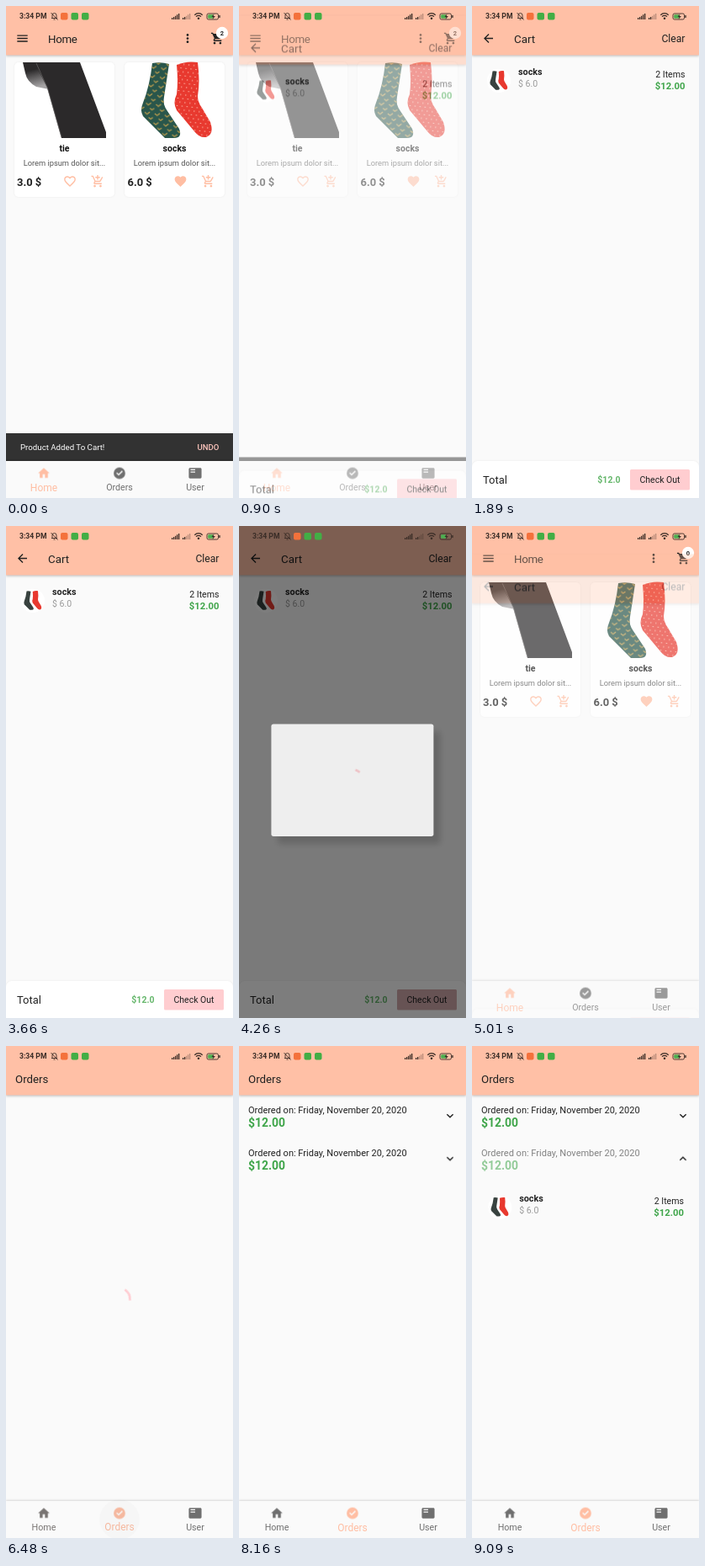
Animation, 270 px wide and 585 px high, one loop 9.24 s. Source, as an HTML page:

```html
<!DOCTYPE html>
<html lang="en">
<head>
<meta charset="utf-8">
<title>Shop app</title>
<style>
html, body { margin: 0; width: 100%; height: 100%; overflow: hidden; background: #fafafa; }
svg { display: block; width: 100vw; height: 100vh; overflow: hidden; font-family: Roboto, sans-serif; fill: #212121; }
svg * { animation-duration: 9240ms; animation-iteration-count: infinite; animation-fill-mode: both; }

.icon { transform: scale(.6875) translate(-12px, -12px); }
.b { font-weight: 700; }
.mid { text-anchor: middle; }
.end { text-anchor: end; }
.page { fill: #fafafa; }
.peach { fill: #ffbea3; }
.green { fill: #3fa54a; }
.grey { fill: #999; }
.bar { fill: #ffc0a6; filter: drop-shadow(0 1.6px 1.8px rgba(0, 0, 0, .26)); }
.title { font-size: 13.3px; }
.card { fill: #fff; filter: drop-shadow(0 .5px .8px rgba(0, 0, 0, .07)); }
.name { font-size: 10.5px; font-weight: 700; fill: #111; }
.blurb { font-size: 9.3px; fill: #555; }
.price { font-size: 12.9px; font-weight: 700; }
.small { font-size: 10.5px; }
.nav { fill: #fafafa; filter: drop-shadow(0 -.5px .8px rgba(0, 0, 0, .14)); }
.label { font-size: 12px; text-anchor: middle; transform-box: fill-box; transform-origin: 50% 75%; }
.off { fill: #6f6f6f; }
.off .label { transform: scale(.889); }

/* page transition */
.cart { animation-name: slide, fade; }
@keyframes slide {
  0%, 7.576% { transform: translateY(146.25px); animation-timing-function: cubic-bezier(.4, 0, .2, 1); }
  10.823%, 52.597% { transform: none; animation-timing-function: cubic-bezier(.8, 0, .6, 1); }
  55.844%, to { transform: translateY(146.25px); }
}
@keyframes fade {
  0%, 7.576% { opacity: 0; animation-timing-function: ease-in; }
  10.823%, 52.597% { opacity: 1; animation-timing-function: ease-out; }
  55.844%, to { opacity: 0; }
}
.snack { animation-name: snack; }
@keyframes snack {
  0%, 7.63% { transform: none; animation-timing-function: cubic-bezier(.8, 0, .6, 1); }
  10.335%, to { transform: translateY(34px); }
}

/* dialog */
.press { fill: #000; animation-name: press; animation-timing-function: linear; }
@keyframes press {
  0%, 44.7% { opacity: 0; }
  45.8%, 46.6% { opacity: .17; }
  50%, to { opacity: 0; }
}
.barrier { animation-name: barrier; }
@keyframes barrier {
  0%, 44.968% { opacity: 0; animation-timing-function: ease; }
  46.591%, 52.489% { opacity: .54; animation-timing-function: cubic-bezier(.75, 0, .75, .9); }
  54.113%, to { opacity: 0; }
}
.dialog { animation-name: dialog; }
.dialog rect { fill: #fff; filter: drop-shadow(8px 9px 3.5px rgba(0, 0, 0, .18)); }
@keyframes dialog {
  0%, 44.968% { opacity: 0; animation-timing-function: ease-out; }
  46.591%, 52.489% { opacity: 1; animation-timing-function: ease-in; }
  54.113%, to { opacity: 0; }
}

/* spinner: one turn of the arc takes a second */
.spin { fill: none; stroke: #ffcdd2; stroke-width: 2.75px; stroke-linecap: square; animation-name: turn, arc; animation-timing-function: linear; }
.dialog .spin { animation-delay: 4190ms; }
.loader .spin { animation-delay: 6362ms; }
@keyframes turn {
  0% { transform: rotate(-90deg); }
  10.823%, to { transform: rotate(216deg); }
}
@keyframes arc {
  0% { stroke-dasharray: 0 360; stroke-dashoffset: 0; animation-timing-function: cubic-bezier(.4, 0, .2, 1); }
  5.411% { stroke-dasharray: 270 90; stroke-dashoffset: 0; animation-timing-function: cubic-bezier(.4, 0, .2, 1); }
  10.823%, to { stroke-dasharray: 0 360; stroke-dashoffset: -270; }
}

/* hard switches */
.two, .zero, .home, .orders, .loader, .list, .line { animation-timing-function: step-end; }
.two { animation-name: two; }
.zero { animation-name: zero; }
.line { animation-name: line; }
.home { animation-name: home; }
.orders { animation-name: orders; }
.loader { animation-name: loader; }
.list { animation-name: list; }
@keyframes two { 0% { opacity: 1; } 50.87%, to { opacity: 0; } }
@keyframes zero { 0% { opacity: 0; } 50.87%, to { opacity: 1; } }
@keyframes line { 0% { opacity: 1; } 52.489%, to { opacity: 0; } }
@keyframes home { 0% { opacity: 1; } 68.669%, to { opacity: 0; } }
@keyframes orders { 0% { opacity: 0; } 68.669%, to { opacity: 1; } }
@keyframes loader { 0% { opacity: 1; } 76.299%, to { opacity: 0; } }
@keyframes list { 0% { opacity: 0; } 76.299%, to { opacity: 1; } }

/* tabs */
.tab-home { animation-name: cool; }
.tab-home .label { animation-name: shrink; }
.tab-orders { animation-name: warm; }
.tab-orders .label { animation-name: grow; }
.tab-home, .tab-orders, .tab-home .label, .tab-orders .label { animation-timing-function: cubic-bezier(.4, 0, .2, 1); }
@keyframes cool { 0%, 68.669% { fill: #ffbea3; } 70.833%, to { fill: #6f6f6f; } }
@keyframes warm { 0%, 68.669% { fill: #6f6f6f; } 70.833%, to { fill: #ffbea3; } }
@keyframes shrink { 0%, 68.669% { transform: none; } 70.833%, to { transform: scale(.889); } }
@keyframes grow { 0%, 68.669% { transform: scale(.889); } 70.833%, to { transform: none; } }
.ripple { fill: #000; animation-name: ripple; animation-timing-function: linear; }
@keyframes ripple {
  0%, 67.75% { opacity: 0; transform: scale(.3); }
  68.6% { opacity: .035; transform: scale(.75); }
  70.13% { opacity: .015; transform: none; }
  72.5%, to { opacity: 0; transform: none; }
}

/* expanding order */
.head { animation-name: dim; animation-timing-function: linear; }
.chevron { animation-name: flip; animation-timing-function: cubic-bezier(.4, 0, .2, 1); }
.detail { animation-name: reveal; animation-timing-function: linear; }
@keyframes dim { 0%, 92.857% { opacity: 1; } 98.268%, to { opacity: .55; } }
@keyframes flip { 0%, 92.857% { transform: none; } 98.268%, to { transform: rotate(-180deg); } }
@keyframes reveal {
  0%, 92.857% { opacity: 0; clip-path: inset(0 0 100% 0); }
  98.268%, to { opacity: 1; clip-path: inset(0); }
}
</style>
</head>
<body>
<svg viewBox="0 0 270 585">
  <defs>
    <path id="menu" class="icon" d="M3 18h18v-2H3v2zm0-5h18v-2H3v2zm0-7v2h18V6H3z"/>
    <path id="more" class="icon" d="M12 8c1.1 0 2-.9 2-2s-.9-2-2-2-2 .9-2 2 .9 2 2 2zm0 2c-1.1 0-2 .9-2 2s.9 2 2 2 2-.9 2-2-.9-2-2-2zm0 6c-1.1 0-2 .9-2 2s.9 2 2 2 2-.9 2-2-.9-2-2-2z"/>
    <path id="trolley" class="icon" d="M7 18c-1.1 0-1.99.9-1.99 2S5.9 22 7 22s2-.9 2-2-.9-2-2-2zM1 2v2h2l3.6 7.59-1.35 2.45c-.16.28-.25.61-.25.96 0 1.1.9 2 2 2h12v-2H7.42c-.14 0-.25-.11-.25-.25l.03-.12.9-1.63h7.45c.75 0 1.41-.41 1.75-1.03l3.58-6.49c.08-.14.12-.31.12-.48 0-.55-.45-1-1-1H5.21l-.94-2H1zm16 16c-1.1 0-1.99.9-1.99 2s.89 2 1.99 2 2-.9 2-2-.9-2-2-2z"/>
    <path id="add" class="icon" d="M11 9h2V6h3V4h-3V1h-2v3H8v2h3v3zm-4 9c-1.1 0-1.99.9-1.99 2S5.9 22 7 22s2-.9 2-2-.9-2-2-2zm10 0c-1.1 0-1.99.9-1.99 2s.89 2 1.99 2 2-.9 2-2-.9-2-2-2zm-9.83-3.25l.03-.12.9-1.63h7.45c.75 0 1.41-.41 1.75-1.03l3.86-7.01L19.42 4h-.01l-1.1 2-2.76 5H8.53l-.13-.27L6.16 6l-.95-2-.94-2H1v2h2l3.6 7.59-1.35 2.45c-.16.28-.25.61-.25.96 0 1.1.9 2 2 2h12v-2H7.42c-.13 0-.25-.11-.25-.25z"/>
    <path id="heart" class="icon" d="M12 21.35l-1.45-1.32C5.4 15.36 2 12.28 2 8.5 2 5.42 4.42 3 7.5 3c1.74 0 3.41.81 4.5 2.09C13.09 3.81 14.76 3 16.5 3 19.58 3 22 5.42 22 8.5c0 3.78-3.4 6.86-8.55 11.54L12 21.35z"/>
    <path id="heart-line" class="icon" d="M16.5 3c-1.74 0-3.41.81-4.5 2.09C10.91 3.81 9.24 3 7.5 3 4.42 3 2 5.42 2 8.5c0 3.78 3.4 6.86 8.55 11.54L12 21.35l1.45-1.32C18.6 15.36 22 12.28 22 8.5 22 5.42 19.58 3 16.5 3zm-4.4 15.55l-.1.1-.1-.1C7.14 14.24 4 11.39 4 8.5 4 6.5 5.5 5 7.5 5c1.54 0 3.04.99 3.57 2.36h1.87C13.46 5.99 14.96 5 16.5 5c2 0 3.5 1.5 3.5 3.5 0 2.89-3.14 5.74-7.9 10.05z"/>
    <path id="back" class="icon" d="M20 11H7.83l5.59-5.59L12 4l-8 8 8 8 1.41-1.41L7.83 13H20v-2z"/>
    <path id="house" class="icon" d="M10 20v-6h4v6h5v-8h3L12 3 2 12h3v8z"/>
    <path id="check" class="icon" fill-rule="evenodd" d="M12 2a10 10 0 1 0 0 20 10 10 0 1 0 0-20zM10.600 16.300l-4.200-4.200 1.500-1.500 2.700 2.700 5.700-5.700 1.500 1.500z"/>
    <path id="panel" class="icon" d="M21 3H3c-1.1 0-2 .9-2 2v14c0 1.1.9 2 2 2h18c1.1 0 2-.9 2-2V5c0-1.1-.9-2-2-2zm-9 8H4V9h8v2zm0-4H4V5h8v2z"/>
    <path id="down" class="icon" d="M16.59 8.59L12 13.17 7.41 8.59 6 10l6 6 6-6z"/>

    <linearGradient id="fold" x1="0" y1="0" x2=".25" y2="1">
      <stop offset=".35" stop-color="#2b292a"/><stop offset="1" stop-color="#a5a3a4"/>
    </linearGradient>
    <pattern id="birds" width="12" height="11" patternUnits="userSpaceOnUse" patternTransform="rotate(8)">
      <path d="M1 3l3 2 3-3M6.500 8.500l2.500 1.700 2.500-2.300" fill="none" stroke="#b99b4c" stroke-width="1.300"/>
    </pattern>
    <pattern id="dots" width="6" height="9" patternUnits="userSpaceOnUse" patternTransform="rotate(6)">
      <path d="M1 2h1.300M4 6.500h1.300" stroke="#ffc9b8" stroke-width="1.200"/>
    </pattern>
    <path id="sock-a" d="M174 68Q184 66 194 69L188 108Q186 117 192 125L206 146Q210 157 200 157H189L163 131Q159 124 163 115 171 95 174 68Z"/>
    <path id="sock-b" d="M203 70Q215 65 228 67 231 90 228 107 228 114 233 121L243 138Q248 152 238 156 230 157 224 149L203 124Q198 115 203 105 205 90 203 70Z"/>
    <g id="socks">
      <use href="#sock-a" fill="#29564b"/><use href="#sock-a" fill="url(#birds)"/>
      <use href="#sock-b" fill="#e8392f"/><use href="#sock-b" fill="url(#dots)"/>
    </g>
    <g id="item">
      <circle cx="32" cy="89" r="14" fill="#fff"/>
      <g transform="translate(32 88.500) scale(.25) translate(-204 -112)">
        <use href="#sock-a" fill="#38423f"/><use href="#sock-b" fill="#e8392f"/>
      </g>
      <text x="55" y="82" class="b" font-size="10.8">socks</text>
      <text x="55" y="96" class="small grey">$ 6.0</text>
    </g>
    <g id="sum" class="end">
      <text x="253.500" y="85" font-size="10.6">2 Items</text>
      <text x="253.500" y="99" class="b green" font-size="11.3">$12.00</text>
    </g>
    <g id="order">
      <text x="11" y="79.500" font-size="11">Ordered on: Friday, November 20, 2020</text>
      <text x="11" y="95.500" class="b green" font-size="13.9">$12.00</text>
    </g>
  </defs>

  <rect class="page" width="270" height="585"/>

  <g class="home">
    <rect class="card" x="10" y="67" width="119" height="160" rx="5"/>
    <rect class="card" x="141" y="67" width="119" height="160" rx="5"/>
    <path d="M20 67H46L51 99 36 96Q25 90 23 80Z" fill="url(#fold)"/>
    <path d="M34 67H88L119 150V157H66L49 97Z" fill="#2b292a"/>
    <path d="M36 68L49.500 98 66 156" fill="none" stroke="#6a6868" stroke-width=".7"/>
    <use href="#socks"/>
    <g class="mid">
      <text x="69.500" y="173" class="name">tie</text>
      <text x="200.500" y="173" class="name">socks</text>
      <text x="69.500" y="190" class="blurb">Lorem ipsum dolor sit...</text>
      <text x="200.500" y="190" class="blurb">Lorem ipsum dolor sit...</text>
    </g>
    <text x="13" y="213.500" class="price">3.0 $</text>
    <text x="144.500" y="213.500" class="price">6.0 $</text>
    <g class="peach">
      <use href="#heart-line" x="76" y="208.500"/>
      <use href="#add" x="109" y="208.500"/>
      <use href="#heart" x="207.500" y="208.500"/>
      <use href="#add" x="240.500" y="208.500"/>
    </g>
    <rect class="bar" width="270" height="58.400"/>
    <use href="#menu" x="19.500" y="38.500"/>
    <text x="50" y="44" class="title" letter-spacing="-.3">Home</text>
    <use href="#more" x="216" y="38.500"/>
    <use href="#trolley" x="251.500" y="38.500"/>
    <circle cx="257" cy="32" r="7.200" fill="#fff"/>
    <g class="b mid" font-size="7.500">
      <text x="257" y="34.700" class="two">2</text>
      <text x="257" y="34.700" class="zero">0</text>
    </g>
  </g>

  <g class="orders">
    <rect class="bar" width="270" height="58.400"/>
    <text x="11" y="44" class="title">Orders</text>
    <g class="loader">
      <g transform="translate(135 300.500)"><circle class="spin" r="12.400" pathLength="360"/></g>
    </g>
    <g class="list">
      <use href="#order"/>
      <use href="#down" x="251" y="83"/>
      <g class="head"><use href="#order" y="51"/></g>
      <g transform="translate(251 134)"><g class="chevron"><use href="#down"/></g></g>
      <g class="detail">
        <use href="#item" x="1.200" y="102.800"/>
        <use href="#sum" x="-1.500" y="102.800"/>
      </g>
    </g>
  </g>

  <g class="snack">
    <rect y="508" width="270" height="33" fill="#323232"/>
    <text x="17" y="528" font-size="9.700" fill="#fff">Product Added To Cart!</text>
    <text x="253.500" y="528" class="end" font-size="9.600" font-weight="500" fill="#fdc5bd">UNDO</text>
  </g>

  <rect class="nav" y="541" width="270" height="50"/>
  <g transform="translate(135 563)"><circle class="ripple" r="24"/></g>
  <g class="tab-home">
    <use href="#house" x="45" y="555.500"/>
    <text x="45" y="576.500" class="label">Home</text>
  </g>
  <g class="tab-orders">
    <use href="#check" x="135" y="555.500"/>
    <text x="135" y="576.500" class="label">Orders</text>
  </g>
  <g class="off">
    <use href="#panel" x="225" y="555.500"/>
    <text x="225" y="576.500" class="label">User</text>
  </g>

  <g class="cart">
    <rect class="page" width="270" height="585"/>
    <rect class="bar" width="270" height="58.400"/>
    <use href="#back" x="19.500" y="38.500"/>
    <text x="50" y="44" class="title">Cart</text>
    <text x="253.500" y="43" class="end" font-size="12.200">Clear</text>
    <g class="line"><use href="#item"/><use href="#sum"/></g>
    <rect x="0" y="541" width="270" height="60" rx="7" class="card"/>
    <text x="13" y="568" font-size="12.900">Total</text>
    <text x="176.500" y="567" class="b end" font-size="10.500" fill="#66b76c">$12.0</text>
    <rect x="188" y="551" width="71" height="24.500" rx="1.500" fill="#ffcdd0"/>
    <rect x="188" y="551" width="71" height="24.500" rx="1.500" class="press"/>
    <text x="223.500" y="567" class="small mid">Check Out</text>
  </g>

  <rect class="barrier" width="270" height="585" fill="#000"/>
  <g class="dialog">
    <rect x="38.400" y="235.500" width="193" height="133.500" rx="2.750"/>
    <g transform="translate(135 302)"><circle class="spin" r="12.400" pathLength="360"/></g>
  </g>

  <g fill="#3a2d27">
    <text x="16" y="15.200" class="b" font-size="8.600">3:34 PM</text>
    <g fill="none" stroke="#3a2d27" stroke-width=".9">
      <path d="M54 14.500h7M55 14.500v-3.500a2.500 2.500 0 0 1 5 0v3.500M56.500 16h2M53.500 8l8 8.500"/>
      <path d="M224.300 10.700a6.500 6.500 0 0 1 9.400 0M226 12.600a4.200 4.200 0 0 1 6 0" stroke-width="1.300"/>
      <rect x="239" y="9" width="13.500" height="7" rx="1.800"/>
    </g>
    <circle cx="229" cy="14.800" r="1.300"/>
    <rect x="253.300" y="11" width="1.400" height="3" rx=".6"/>
    <rect x="240.200" y="10.200" width="6.500" height="4.600" rx=".8" fill="#4caf50"/>
    <path d="M247.500 9.200l-3 3.800h2l-.8 3 3.200-4h-2.100z"/>
    <path d="M197 14h1.300v2H197zM199 13h1.300v3H199zM201 11.700h1.300V16H201zM203 10.300h1.300V16H203zM205 9h1.300v7H205z"/>
    <path d="M210 14h1.300v2H210zM212 13h1.300v3H212z"/>
    <path d="M214 11.700h1.300V16H214zM216 10.300h1.300V16H216zM218 9h1.300v7H218z" opacity=".35"/>
    <rect x="65" y="8" width="8.500" height="8.500" rx="2" fill="#f4713b"/>
    <rect x="77.500" y="8" width="8.500" height="8.500" rx="2" fill="#42ae45"/>
    <rect x="90" y="8" width="8.500" height="8.500" rx="2" fill="#42ae45"/>
  </g>
</svg>
</body>
</html>
```
